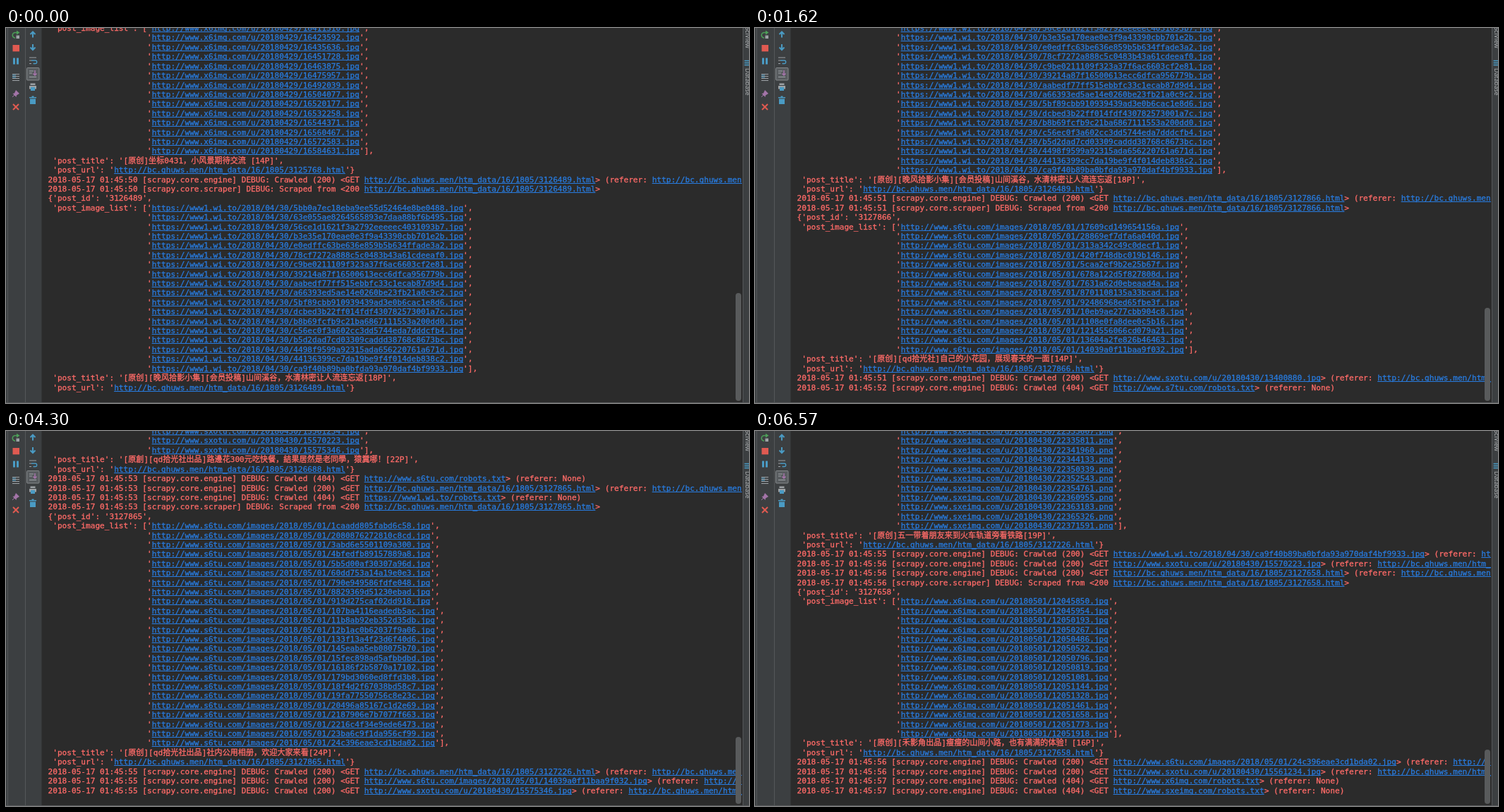
These frames come from a looping animation (1053x532 px, 6.67 s). An HTML page:

```html
<!DOCTYPE html>
<html lang="en">
<head>
<meta charset="utf-8">
<title>Crawler console</title>
<style>
  html, body { margin: 0; width: 100%; height: 100%; overflow: hidden; background: #2b2b2b; }
  #console { position: absolute; left: 50px; top: 0; width: 993px; height: 532px; overflow: hidden; }
  #log {
    position: absolute; left: 9.5px; margin: 0; white-space: pre; color: #ff6b68;
    font: 11.12px/13.41px "DejaVu Sans Mono", "Noto Sans CJK SC", "Noto Sans CJK", monospace;
    font-variant-ligatures: none; -webkit-text-stroke: .3px;
  }
  #log u { color: #287bde; text-decoration: underline 1px; text-underline-offset: 1.3px; text-decoration-skip-ink: none; }
  #thumb { position: absolute; left: 984px; width: 8px; border-radius: 4px; background: #595b5c; }
  svg { position: absolute; left: 0; top: 0; }
  .panel { fill: #3c3f41; }
  .green { fill: #4c9f58; }
  .red { fill: #e05a51; }
  .blue { fill: #4a9bc4; }
  .gray { fill: #9da2a6; }
  .purple { fill: #a374a8; }
  .line { fill: none; stroke: #555759; }
  .green.line { stroke: #4c9f58; }
  .red.line { stroke: #e05a51; }
  .blue.line { stroke: #4a9bc4; }
  .gray.line { stroke: #9da2a6; }
  .purple.line { stroke: #a374a8; }
</style>
</head>
<body>
<div id="console"><pre id="log"></pre><div id="thumb"></div></div>
<svg width="1053" height="532">
  <path class="panel" d="M0 0h50.5v532h-50.5zM1044 0h9v532h-9z"/>
  <path class="line" d="M2.5 0v532M27.5 0v532M1044.5 0v532M0 531.5h1053"/>
  <!-- run controls -->
  <g transform="translate(14)">
    <path class="green line" stroke-width="1.6" d="M2 6.500h-3a3.500 3.500 0 0 0 0 7.500"/>
    <path class="green" d="M1 3.500l4.500 3-4.500 3z"/>
    <path class="gray" d="M.5 10.500h4.500v4.500h-4.500z"/>
    <path class="red" d="M-4.500 24h9.500v9.300h-9.500z"/>
    <path class="blue" d="M-4 42.500h3v9h-3zM1 42.500h3v9h-3z"/>
    <path class="gray line" d="M-5 65.500h10M-5 68.500h10M-5 71.500h10M-5 74.500h10"/>
    <path class="blue line" d="M-5 67h5M-5 70h5"/>
    <path class="purple" d="M0 88l5 5-4 2.500-.5 2.500-5-5 2.500-.5z"/>
    <path class="purple line" d="M-2 95l-3 3"/>
    <path class="red line" stroke-width="2" d="M-4 108l8 8M4 108l-8 8"/>
  </g>
  <!-- console controls -->
  <g transform="translate(38)">
    <path class="blue line" stroke-width="2" d="M0 13.500v-7M-3.500 9l3.500-3.500 3.500 3.500M0 23v7M-3.500 27.500l3.500 3.500 3.500-3.500"/>
    <path class="gray line" d="M-5 42h10M-5 46h3M-5 50.500h3"/>
    <path class="blue line" stroke-width="1.3" d="M-2 46h5.500a2 2 0 0 1 0 4.500h-3"/>
    <rect x="-8.500" y="56.500" width="17.500" height="17.500" rx="1" fill="#585c5f" stroke="#85898b"/>
    <path class="gray line" d="M-5 61h6M-5 64h4M-5 69.500h10"/>
    <path class="purple line" stroke-width="1.6" d="M3 60v7M.5 64.500l2.500 2.500 2.500-2.500"/>
    <path class="gray" d="M-3.500 78.500h7v2.500h-7zM-5 82h10v4.500h-10z"/>
    <path class="blue" d="M-3 84h6v5h-6zM-5 98h10v1.500h-10zM-1.500 96.500h3v1.500h-3zM-4 100.500h8v7.500h-8z"/>
  </g>
  <!-- right tool strip -->
  <path class="blue line" stroke-width="1.7" d="M1046.500 46.500h7M1046.500 49.500h7M1046.500 52.500h7"/>
  <g fill="#b4b7b9" font-family="Open Sans, sans-serif" font-size="8.8">
    <text transform="translate(1047.500 28.500) rotate(90)" text-anchor="end">SciView</text>
    <text transform="translate(1047.500 57) rotate(90)">Database</text>
  </g>
</svg>
<script>
let seed = 7;
const random = () => (seed = seed * 16807 % 2147483647) / 2147483647;
const range = (count, make) => Array.from({ length: count }, (_, i) => make(i));
const hex = length => range(length, () => Math.floor(random() * 16).toString(16)).join('');

// File names: plain hashes, numbered hashes, or rising upload times (hhmmss plus hundredths).
const hashes = count => range(count, () => hex(32));
const numbered = count => range(count, i => i + 1 + hex(16));
function uploads(count, from, to) {
  const seconds = clock => clock.split(':').reduce((sum, part) => sum * 60 + +part, 0);
  const start = seconds(from), gap = (seconds(to) - start) / (count - 1);
  return range(count, i => {
    const time = new Date((start + i * gap) * 1000).toISOString().slice(11, 19);
    return time.replaceAll(':', '') + Math.floor(10 + random() * 90);
  });
}

const lines = [], states = [];
const forum = 'http://bc.ghuws.men/htm_data/16/';
const page = id => `${forum}1805/${id}.html`;
const link = url => `<u>${url}</u>`;

function debug(second, part, text) {
  lines.push(`2018-05-17 01:45:${second} [scrapy.core.${part}] DEBUG: ${text}`);
}
function crawled(second, url) {
  debug(second, 'engine', `Crawled (200) &lt;GET ${link(url)}> (referer: ${link(forum)})`);
}
function noRobots(second, host) {
  debug(second, 'engine', `Crawled (404) &lt;GET ${link(host + '/robots.txt')}> (referer: None)`);
}
function scraped(second, id, urls, title) {
  debug(second, 'scraper', `Scraped from &lt;200 ${link(page(id))}>`);
  lines.push(`{'post_id': '${id}',`);
  urls.forEach((url, i) => lines.push(
    (i ? ' '.repeat(21) : " 'post_image_list': [") +
    `'${link(url)}'${i < urls.length - 1 ? ',' : '],'}`));
  lines.push(` 'post_title': '${title}',`, ` 'post_url': '${link(page(id))}'}`);
}
// Shows everything printed so far; lag is the distance still to scroll.
function show(start, lag = 0) {
  states.push({ start, lag, count: lines.length });
}

const x6 = 'http://www.x6img.com', sxo = 'http://www.sxotu.com', s6 = 'http://www.s6tu.com';
const sxe = 'http://www.sxeimg.com', wi = 'https://www1.wi.to';
const files = (folder, names, ext = '.jpg') => names.map(name => folder + name + ext);

const coast = files(x6 + '/u/20180429/', uploads(14, '16:41:15', '16:58:46'));
const valley = files(wi + '/2018/04/30/', hashes(18));
const garden = files(s6 + '/images/2018/05/01/', numbered(14));
const lunch = files(sxo + '/u/20180430/', uploads(22, '15:40:13', '15:57:53'));
const album = files(s6 + '/images/2018/05/01/', numbered(24));
const railway = files(sxe + '/u/20180430/', uploads(19, '22:30:41', '22:37:15'), '.png');
const trail = files(x6 + '/u/20180501/', uploads(15, '12:04:58', '12:05:19'));

scraped(50, 3125768, coast, '[原创]坐标0431，小风景期待交流 [14P]');
crawled(50, page(3126489));
scraped(50, 3126489, valley, '[原创][晚风拾影小集][会员投稿]山间溪谷，水清林密让人流连忘返[18P]');
show(0);

crawled(51, page(3127866));
scraped(51, 3127866, garden, '[原创][qd拾光社]自己的小花园，展现春天的一面[14P]');
show(300, 116);
show(570);
crawled(51, sxo + '/u/20180430/13400880.jpg');
show(960);

noRobots(52, 'http://www.s7tu.com');
show(1620);
crawled(52, page(3126688));
scraped(52, 3126688, lunch, '[原創][qd拾光社出品]路邊花300元吃快餐，結果居然是老同學，猿糞哪！[22P]');
show(1980);
noRobots(53, s6);
show(2210);

crawled(53, page(3127865));
noRobots(53, wi);
scraped(53, 3127865, album, '[原创][qd拾光社出品]社内公用相册，欢迎大家来看[24P]');
show(3020, 3.6);
show(3260);

crawled(55, page(3127226));
crawled(55, garden.at(-1));
crawled(55, lunch.at(-1));
show(4300);
scraped(55, 3127226, railway, '[原创]五一带着朋友来到火车轨道旁看铁路[19P]');
show(4590);
crawled(55, valley.at(-1));
show(4830);

crawled(56, lunch.at(-2));
crawled(56, page(3127658));
scraped(56, 3127658, trail, '[原创][禾影角出品]瘦瘦的山间小路，也有满满的体验！[16P]');
show(5490);
crawled(56, album.at(-1));
show(5870, 3.6);
crawled(56, lunch.at(-3));
show(6140);
noRobots(57, x6);
noRobots(57, sxe);
show(6570);

const LOOP = 6670, EARLIER_LINES = 92, VIEW_LINES = 39.5, TRACK = 515;
const log = document.getElementById('log'), thumb = document.getElementById('thumb');
let current;

function draw() {
  const time = performance.now() % LOOP;
  const state = states.findLast(({ start }) => start <= time);
  if (state !== current) {
    current = state;
    const { count, lag } = state, total = count + EARLIER_LINES;
    log.innerHTML = lines.slice(Math.max(0, count - 52), count).join('\n');
    log.style.bottom = 15.1 - lag + 'px';
    thumb.style.height = TRACK * VIEW_LINES / total + 'px';
    thumb.style.bottom = 3 + lag * VIEW_LINES / total + 'px';
  }
  requestAnimationFrame(draw);
}
draw();
</script>
</body>
</html>
```
